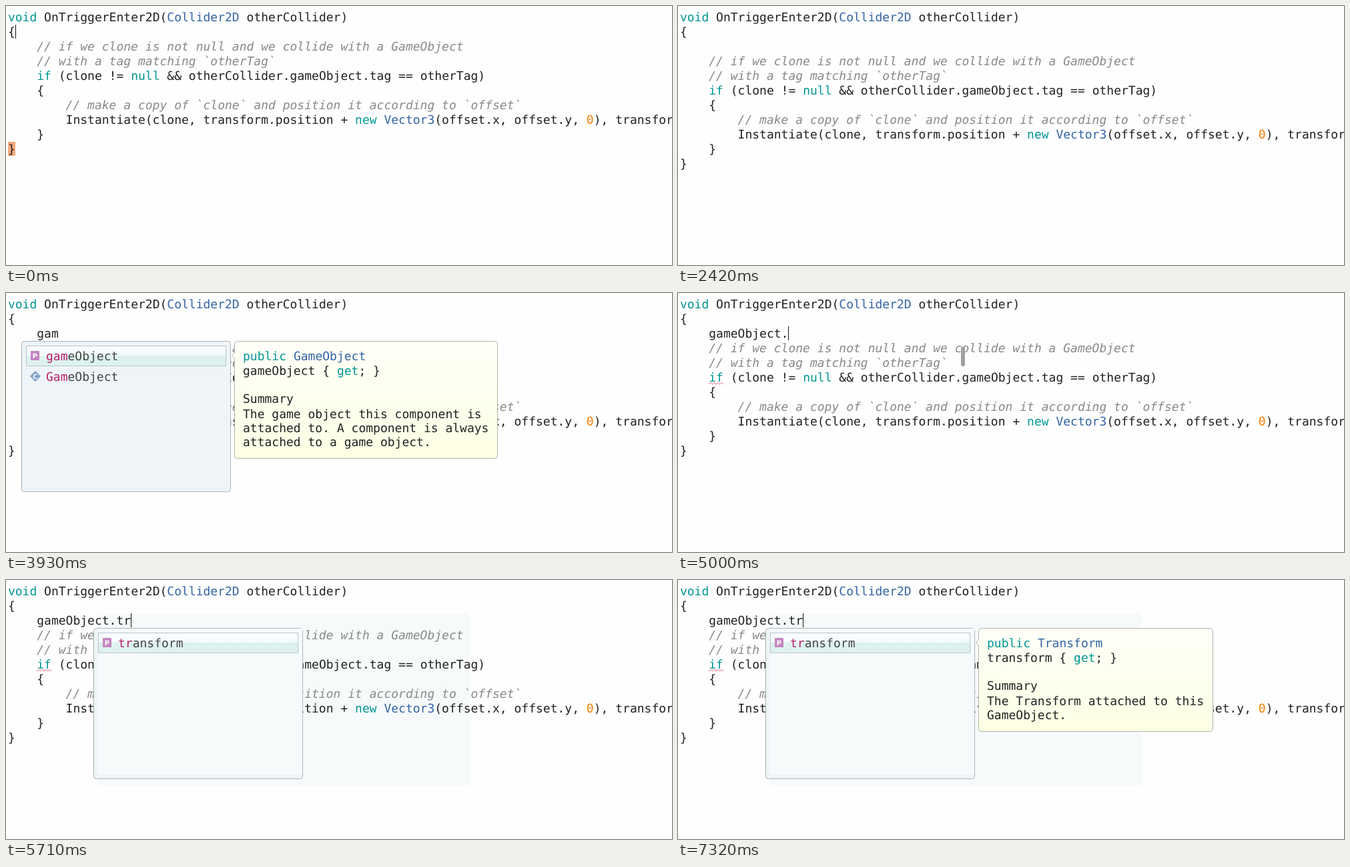
Animation, 998 px wide and 389 px high, one loop 8 s. Source, as an HTML page:

```html
<!DOCTYPE html>
<html lang="en">
<head>
<meta charset="utf-8">
<title>Code completion</title>
<style>
  html, body { margin: 0; width: 100%; height: 100%; overflow: hidden; background: #fefefe; }
  svg { display: block; width: 998px; height: 389px; }
  text {
    font: 18px "DejaVu Sans Mono", "Liberation Mono", monospace;
    text-rendering: geometricPrecision;
    white-space: pre;
    fill: #222;
  }
  .kw { fill: #009695; }
  .type { fill: #3364a4; }
  .num { fill: #f57d00; }
  .note { fill: #888; font-style: italic; }
  .item { fill: #444; }
  .hit { fill: #b8206c; }
  .badge { font: bold 10px "DejaVu Sans", sans-serif; fill: #fff; text-anchor: middle; }
</style>
</head>
<body>
<svg viewBox="0 0 998 389" xmlns="http://www.w3.org/2000/svg">
  <defs>
    <linearGradient id="pick" x2="0" y2="1">
      <stop offset="0" stop-color="#fafdfe"/>
      <stop offset=".5" stop-color="#f3fafa"/>
      <stop offset=".5" stop-color="#dcf1ee"/>
      <stop offset="1" stop-color="#def2ef"/>
    </linearGradient>
    <linearGradient id="paper" x2="0" y2="1">
      <stop offset="0" stop-color="#fffff8"/>
      <stop offset="1" stop-color="#fdffe4"/>
    </linearGradient>
  </defs>
  <g id="view"></g>
</svg>
<script>
const LOOP = 8000;
const LEFT = 2.9, CHAR = 10.836, LINE = 22;

const head = ['void OnTriggerEnter2D(Collider2D otherCollider)', '{'];
const body = [
  '    // if we clone is not null and we collide with a GameObject',
  '    // with a tag matching `otherTag`',
  '    if (clone != null && otherCollider.gameObject.tag == otherTag)',
  '    {',
  '        // make a copy of `clone` and position it according to `offset`',
  '        Instantiate(clone, transform.position + new Vector3(offset.x, offset.y, 0), transform.rotation);',
  '    }',
  '}'
];

// First letter is the icon, brackets mark matched letters.
const lists = {
  g: ['P[g]ameObject', 'C[G]ameObject', 'C[G]eometryUtility', 'C[G]izmos',
      'C[G]radient', 'S[G]radientAlphaKey', 'C[G]UI'],
  ga: ['P[ga]meObject', 'C[Ga]meObject', 'S[G]radient[A]lphaKey', 'C[G]UITarget[A]ttribute'],
  gam: ['P[gam]eObject', 'C[Gam]eObject'],
  all: ['Pactive', 'PactiveInHierarchy', 'PactiveSelf', 'MAddComponent',
        'Panimation', 'Paudio', 'MBroadcastMessage'],
  tr: ['P[tr]ansform']
};

const docs = {
  object: {
    x: 342, w: 395, h: 177,
    code: ['public GameObject', 'gameObject { get; }'],
    text: ['The game object this component is', 'attached to. A component is always', 'attached to a game object.']
  },
  active: {
    x: 450, w: 244, h: 237,
    code: ['public bool', 'active { get; set; }'],
    text: ['Is this game object', 'active in the scene?', 'The state depends on',
           'its parents as well', 'as on its own local', 'active flag.']
  },
  transform: {
    x: 450, w: 352, h: 156,
    code: ['public Transform', 'transform { get; }'],
    text: ['The Transform attached to this', 'GameObject.']
  }
};

// Each step changes only the listed parts of the state.
const steps = [
  [0, { typed: null, caret: true }],
  [360, { caret: false }],
  [1170, { caret: true }],
  [1580, { typed: '' }],
  [2420, { caret: false }],
  [2560, { typed: 'g', caret: true }],
  [2620, { popX: 23, list: [] }],
  [2680, { list: lists.g }],
  [2860, { typed: 'ga' }],
  [2920, { list: lists.ga }],
  [3030, { doc: docs.object }],
  [3090, { typed: 'gam', list: lists.gam }],
  [3930, { caret: false }],
  [3990, { typed: 'gameObject', caret: true, list: null, doc: null }],
  [4230, { error: true }],
  [4820, { caret: false }],
  [5000, { typed: 'gameObject.', caret: true, thumb: true }],
  [5060, { popX: 131, list: lists.all, thumb: false }],
  [5170, { doc: docs.active }],
  [5590, { typed: 'gameObject.t', doc: null, tint: true }],
  [5650, { typed: 'gameObject.tr' }],
  [5710, { list: lists.tr }],
  [5890, { doc: docs.transform }],
  [6480, { caret: false }],
  [7320, { caret: true }]
];

const esc = s => s.replace(/&/g, '&amp;').replace(/</g, '&lt;');
const span = (cls, s) => `<tspan class="${cls}">${s}</tspan>`;
const text = (x, y, s, cls = '') => `<text x="${x}" y="${y}" class="${cls}">${s}</text>`;
const rect = (x, y, w, h, fill, more = '') =>
  `<rect x="${x}" y="${y}" width="${w}" height="${h}" fill="${fill}" ${more}/>`;
const frame = (x, y, w, h, fill, line, r) =>
  rect(x + .5, y + .5, w - 1, h - 1, fill, `stroke="${line}" rx="${r}"`);

function color(s) {
  return esc(s)
    .replace(/\b(Collider2D|Vector3)\b|(?<=public )(GameObject|Transform)/g, m => span('type', m))
    .replace(/\b0\b/g, m => span('num', m))
    .replace(/\b(void|if|null|new|public|bool|get|set)\b/g, m => span('kw', m));
}

function codeLine(s, row) {
  const code = s.trimStart();
  const x = LEFT + (s.length - code.length) * CHAR;
  const y = 23 + row * LINE;
  return code.startsWith('//') ? text(x, y, code, 'note') : text(x, y, color(code));
}

function icon(kind, x, y) {
  const tone = { P: '#c584c2', C: '#7e9fca', S: '#90b06f', M: '#8ca3b8' }[kind];
  const shape = kind === 'P' || kind === 'M'
    ? rect(x - 7, y - 7, 13, 14, tone, 'rx="1"')
    : `<path d="M${x - 8} ${y}l8 -8 8 8 -8 8z" fill="${tone}"/>`;
  return shape + text(kind === 'P' || kind === 'M' ? x - .5 : x, y + 3.5, kind, 'badge');
}

const thumb = x => rect(x, 81, 6, 29, '#a0a0a0', 'rx="2"');

function popup({ popX: x, list, tint }) {
  let out = frame(x, 72, 314, 227, '#eef4f7', '#adb3b6', 4);
  if (tint) out += rect(x + 7, 73, 306, 219, '#f6fafb');
  if (list.length) out += frame(x + 7, 79, 300, 31, 'url(#pick)', '#b9c6c9', 0);
  list.forEach((item, i) => {
    const y = 101 + i * 31;
    const label = item.slice(1).replace(/\[(\w+)\]/g, (m, s) => span('hit', s));
    out += icon(item[0], x + 21, y - 7) + text(x + 37, y, label, 'item');
  });
  if (list.length > 6) out += thumb(x + 293);
  return out;
}

function docBox({ x, w, h, code, text: lines }) {
  let out = frame(x, 72, w, h, 'url(#paper)', '#b3b3ac', 4);
  out += `<path d="M${x + 1} 89l-4.500 5 4.500 5" fill="#fffff6" stroke="#b3b3ac"/>`;
  code.forEach((s, i) => out += text(x + 13, 101 + i * 21.5, color(s)));
  out += text(x + 13, 165, 'Summary');
  lines.forEach((s, i) => out += text(x + 13, 188 + i * 21, s));
  return out;
}

function squiggle() {
  let d = 'M46 137';
  for (let i = 1; i < 9; i++) d += `L${46 + i * 2.75} ${i % 2 ? 134.5 : 137}`;
  return `<path d="${d}" fill="none" stroke="#e2687c"/>`;
}

function draw(s) {
  const fresh = s.typed !== null;
  const lines = fresh ? [...head, '    ' + s.typed, ...body] : [...head, ...body];
  let out = s.tint ? rect(138, 50, 556, 259, '#f6fafb') : '';
  if (!fresh) out += rect(3, 204, 11, 21, '#f4a97d');
  out += lines.map(codeLine).join('');
  if (s.error) out += squiggle();
  if (s.caret) {
    const col = fresh ? 4 + s.typed.length : 1;
    out += rect(Math.round(LEFT + col * CHAR), fresh ? 50 : 28, 1, 21, '#111');
  }
  if (s.thumb) out += thumb(424);
  if (s.list) out += popup(s);
  if (s.doc) out += docBox(s.doc);
  return out;
}

const view = document.getElementById('view');
let shown = 0;

function tick(now) {
  const t = now % LOOP;
  const past = steps.filter(([at]) => at <= t);
  if (past.length !== shown) {
    shown = past.length;
    view.innerHTML = draw(Object.assign({}, ...past.map(p => p[1])));
  }
  requestAnimationFrame(() => tick(performance.now() - start));
}

const start = performance.now();
tick(0);
</script>
</body>
</html>
```
